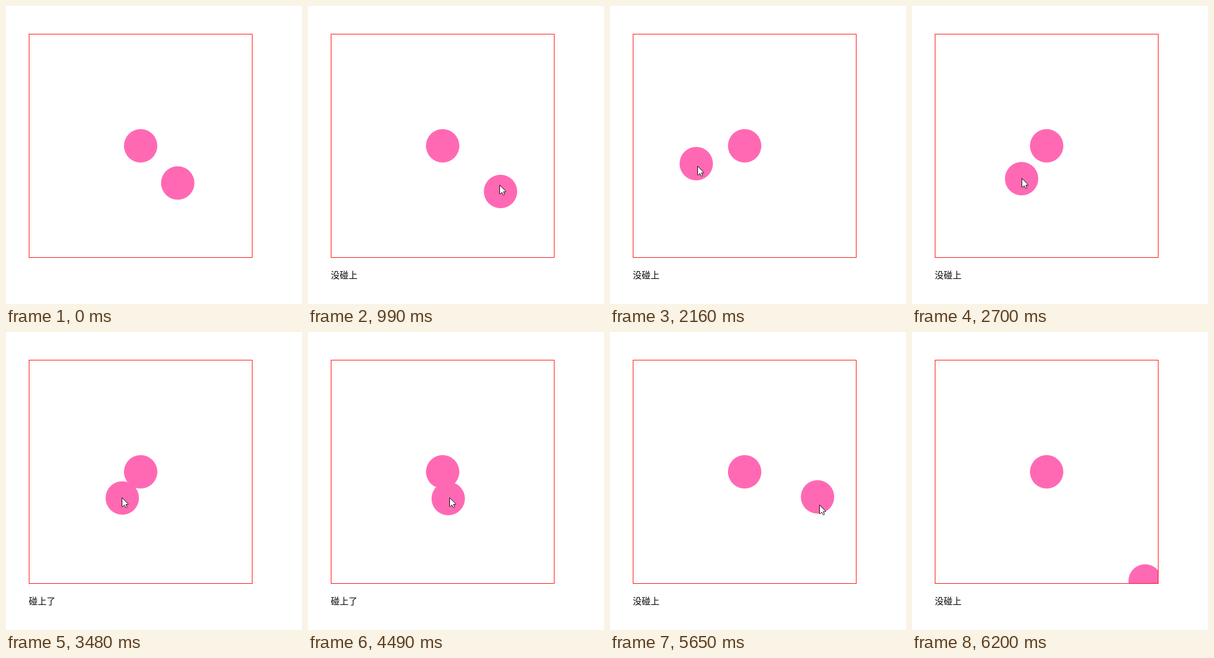
An HTML page that plays this animation: 532 px wide and 535 px high, repeating every 6.52 s.

```html
<!DOCTYPE html>
<html lang="zh-CN">
<head>
<meta charset="utf-8">
<title>碰撞检测</title>
<style>
  html, body { margin: 0; width: 100%; height: 100%; overflow: hidden; background: #fff; }
  svg { display: block; }
  text { font: 16px "Noto Sans CJK SC", "Noto Sans CJK", sans-serif; }
</style>
</head>
<body>
<svg width="532" height="535" viewBox="0 0 532 535">
  <clipPath id="box"><rect x="42" y="51" width="400" height="400"/></clipPath>
  <rect x="41.5" y="50.5" width="401" height="401" fill="none" stroke="red"/>
  <g fill="#ff69b4" clip-path="url(#box)">
    <circle cx="242" cy="251" r="30"/>
    <circle id="ball" r="30"/>
  </g>
  <text id="label" x="41" y="489"></text>
  <path id="cursor" d="M.5 .5V16.5H1.5L4.5 13.5L7.5 18.5H8.5L9.5 17.5L7.5 12.5H11.5V11.5Z" fill="#fff" stroke="#000"/>
</svg>
<script>
const LOOP = 6520;
const LEAVE = 6200;
const LEAD = 0.3; // steps the pointer runs ahead of the ball
const HUB = { x: 242, y: 251 };
const START = { x: 42 + 800 / 3, y: 51 + 800 / 3 };

// Each drag: when it runs, in how many steps, and evenly timed points on its way
const drags = [
  { from: 70, to: 690, steps: 9, way: [[437, 517], [400, 429], [345, 354]] },
  { from: 990, to: 1630, steps: 9, way: [[346, 333], [342, 262], [328, 201], [309, 180], [264, 181]] },
  { from: 1710, to: 2310, steps: 9, way: [[241, 184], [186, 205], [150, 246], [155, 283], [187, 315]] },
  { from: 2390, to: 3020, steps: 9, way: [[189, 316], [205, 304]] },
  { from: 3100, to: 3160, steps: 2, way: [[206, 302], [207, 299]] },
  { from: 3480, to: 3480, steps: 1, way: [[209, 298]] },
  { from: 4260, to: 4870, steps: 9, way: [[215, 300], [262, 294], [291, 242]] },
  { from: 4960, to: 5590, steps: 9, way: [[291, 222], [286, 196], [299, 182], [338, 203], [362, 254]] },
  { from: 5650, to: 6120, steps: 7, way: [[373, 296], [419, 447], [521, 524]] },
];

// Catmull-Rom curve through the points, u from 0 to 1; the ends run on straight
function along(way, u) {
  const last = way.length - 1;
  if (!last) return { x: way[0][0], y: way[0][1] };
  const s = Math.min(u, 1) * last;
  const i = Math.min(Math.floor(s), last - 1), f = s - i;
  const [x, y] = [0, 1].map(c => {
    const b = way[i][c], d = way[i + 1][c];
    const a = i > 0 ? way[i - 1][c] : 2 * b - d;
    const e = i + 1 < last ? way[i + 2][c] : 2 * d - b;
    return Math.round(b + f / 2 * (d - a + f * (2 * a - 5 * b + 4 * d - e + f * (3 * (b - d) + e - a))));
  });
  return { x, y };
}

const inside = p => p.x > 42 && p.x < 442 && p.y > 51 && p.y < 451;
const touches = p => Math.hypot(p.x - HUB.x, p.y - HUB.y) < 60;

function buildFrames() {
  let ball = START, text = "";
  const frames = [{ at: 0, ball, text }];
  for (const { from, to, steps, way } of drags) {
    const n = Math.max(steps - 1, 1);
    for (let k = 0; k < steps; k++) {
      const p = along(way, k / n);
      if (inside(p)) {
        ball = p;
        text = touches(p) ? "碰上了" : "没碰上";
      }
      const early = k > 0 && k < n ? 12 : 0;
      frames.push({ at: from + (to - from) * k / n - early, ball, text, tip: along(way, (k + LEAD) / n) });
    }
  }
  frames.push({ at: LEAVE, ball, text });
  return frames;
}

const frames = buildFrames();
const [ballEl, labelEl, cursorEl] = ["ball", "label", "cursor"].map(id => document.getElementById(id));

function draw(t) {
  const { ball, text, tip } = frames.filter(f => f.at <= t).pop();
  ballEl.setAttribute("cx", ball.x);
  ballEl.setAttribute("cy", ball.y);
  labelEl.textContent = text;
  cursorEl.style.display = tip ? "" : "none";
  if (tip) cursorEl.setAttribute("transform", `translate(${tip.x - 1} ${tip.y - 1})`);
}

const begin = performance.now();
function tick(now) {
  draw(Math.max(0, now - begin) % LOOP);
  requestAnimationFrame(tick);
}
draw(0);
requestAnimationFrame(tick);
</script>
</body>
</html>
```
